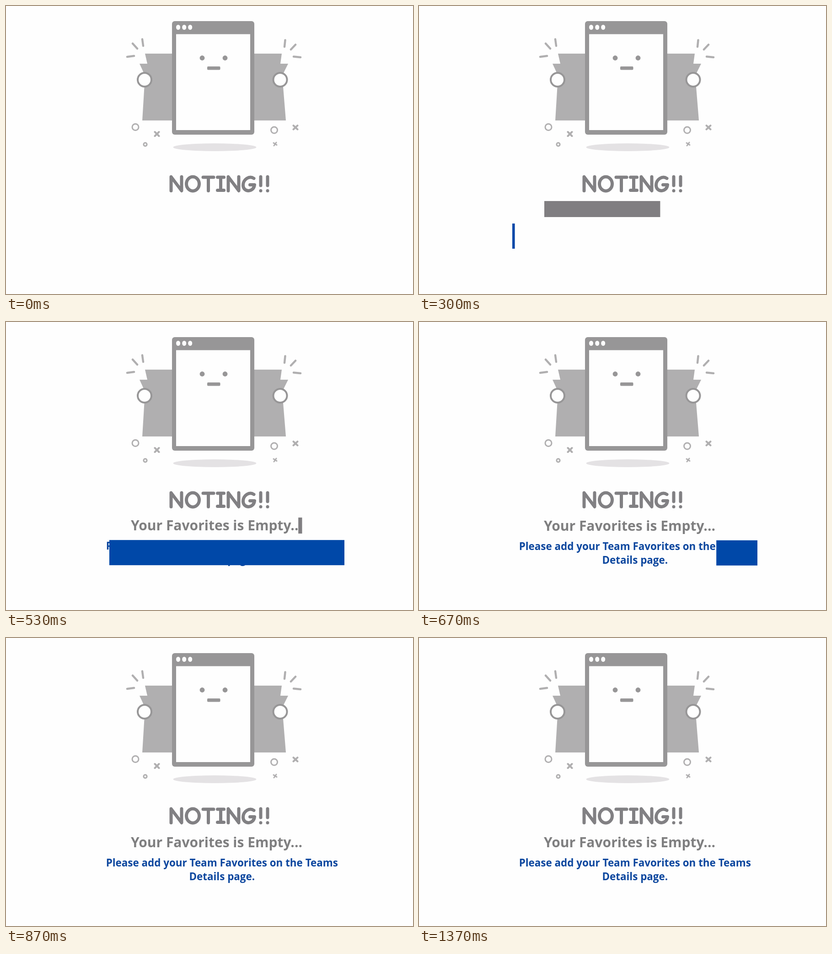
An HTML page that plays this animation: 890x629 px, repeating every 5010 ms.

```html
<!DOCTYPE html>
<html lang="en">
<head>
<meta charset="utf-8">
<title>Empty favorites</title>
<style>
  html, body { margin: 0; width: 100%; height: 100%; overflow: hidden; background: #fefefe; }
  svg { display: block; width: 100%; height: 100%; }
  text { font-family: "Open Sans", "Noto Sans", sans-serif; font-weight: 700; text-anchor: middle; }
  .dark { fill: #979697; }
  .light { fill: #b0afb0; }
  .white { fill: #fefefe; }
  .line { fill: none; stroke: #b0afb0; stroke-linecap: round; }
  .hand { fill: #fefefe; stroke: #979697; stroke-width: 4; }
  .title { fill: none; stroke: #818083; stroke-width: 7; stroke-linecap: round; stroke-linejoin: round; }
</style>
</head>
<body>
<svg viewBox="0 0 890 629">
  <ellipse cx="456.5" cy="308.5" rx="91" ry="8.5" fill="#e4e2e4"/>

  <path class="light" d="M304 104H366V250H298L304 152 292 126H309Z"/>
  <path class="light" d="M540 104H603L600 126H617L604 152 612 250H540Z"/>

  <rect class="dark" x="363" y="33" width="180" height="248" rx="6"/>
  <rect class="white" x="372" y="61.5" width="162" height="209.5"/>
  <g class="white">
    <ellipse cx="376.5" cy="46.5" rx="4.5" ry="5.5"/>
    <ellipse cx="389.7" cy="46.5" rx="4.5" ry="5.5"/>
    <ellipse cx="402.7" cy="46.5" rx="4.5" ry="5.5"/>
  </g>
  <g class="dark">
    <circle cx="429" cy="113.5" r="5.4"/>
    <circle cx="479" cy="113.5" r="5.4"/>
    <rect x="440" y="132" width="28.5" height="7.5" rx="2"/>
  </g>

  <circle class="hand" cx="303" cy="161" r="15"/>
  <circle class="hand" cx="599.5" cy="161" r="15"/>

  <path class="line" stroke-width="4.5" d="M265 111L280 109M277 82L287 93M298 72.500L300 87M610.500 74.500L609 89M633 84.500L623 95M629 110.500L644 112"/>
  <g class="line" stroke-width="3">
    <circle cx="283" cy="264.500" r="7"/>
    <circle cx="586.500" cy="271" r="7"/>
    <circle cx="304.500" cy="302.300" r="3.600"/>
  </g>
  <path class="line" stroke-width="4" d="M325.500 275L334.500 284M334.500 275L325.500 284M628.500 261L637.500 269.500M637.500 261L628.500 269.500"/>
  <path class="line" stroke-width="3" d="M585 299L592 303.500M591 298L586 305"/>

  <g class="title" role="img" aria-label="NOTING!!">
    <path d="M361 403.500V373L384 403.500V373"/>
    <ellipse cx="408.500" cy="388.500" rx="14" ry="15.500"/>
    <path d="M431 374H454M442.500 374V403.500"/>
    <path d="M462.500 374H476.500M469.500 374V402.500M462.500 402.500H476.500"/>
    <path d="M486 403.500V373L509 403.500V373"/>
    <path d="M542 376.500C532 369.500 518.500 379 518.500 391.500C518.500 407 541.500 408 543.500 390.500H533.500"/>
    <path d="M557 373V392M557 403.500V403.600M572 373V392M572 403.500V403.600"/>
  </g>

  <g id="note">
    <text x="460.5" y="457" font-size="30" fill="#7f7f80">Your Favorites is Empty...</text>
    <rect y="428.6" height="35" fill="#807e81"/>
  </g>
  <g id="hint">
    <text font-size="22.4" fill="#0b469e"><tspan x="472.3" y="499">Please add your Team Favorites on the Teams</tspan><tspan x="472.3" y="529">Details page.</tspan></text>
    <rect y="477.7" height="55" fill="#0048a8"/>
  </g>
</svg>
<script>
  const LOOP = 5010;
  const wipes = [
    { id: "note", left: 274, right: 647.5, start: 190, span: 178.5 },
    { id: "hint", left: 204, right: 740, start: 286, span: 216 },
  ].map(w => {
    const group = document.getElementById(w.id);
    return { ...w, group, text: group.querySelector("text"), bar: group.querySelector("rect") };
  });

  const clamp = x => Math.min(1, Math.max(0, x));
  const ease = x => (1 - Math.cos(Math.PI * clamp(x))) / 2;

  // Thirty steps a second, each beginning on a whole 10 ms tick.
  const snap = t => {
    const step = Math.floor((Math.floor(t / 10) * 10 + 9) * 0.03);
    return Math.floor(step * 10 / 3) * 10;
  };

  // The bar grows from the left, then shrinks to the right off the text.
  function draw(t) {
    const drift = -3.3 * (1 - clamp((t - 160) / 690));
    for (const { group, text, bar, left, right, start, span } of wipes) {
      const phase = (t - start) / span;
      const from = left + (right - left) * ease(phase - 1);
      const to = left + (right - left) * ease(phase);
      bar.setAttribute("x", from);
      bar.setAttribute("width", to - from);
      text.setAttribute("visibility", phase >= 1 ? "visible" : "hidden");
      group.setAttribute("transform", `translate(0 ${drift})`);
    }
  }

  const begin = performance.now();
  function tick() {
    draw(snap((performance.now() - begin) % LOOP));
    requestAnimationFrame(tick);
  }
  tick();
</script>
</body>
</html>
```
